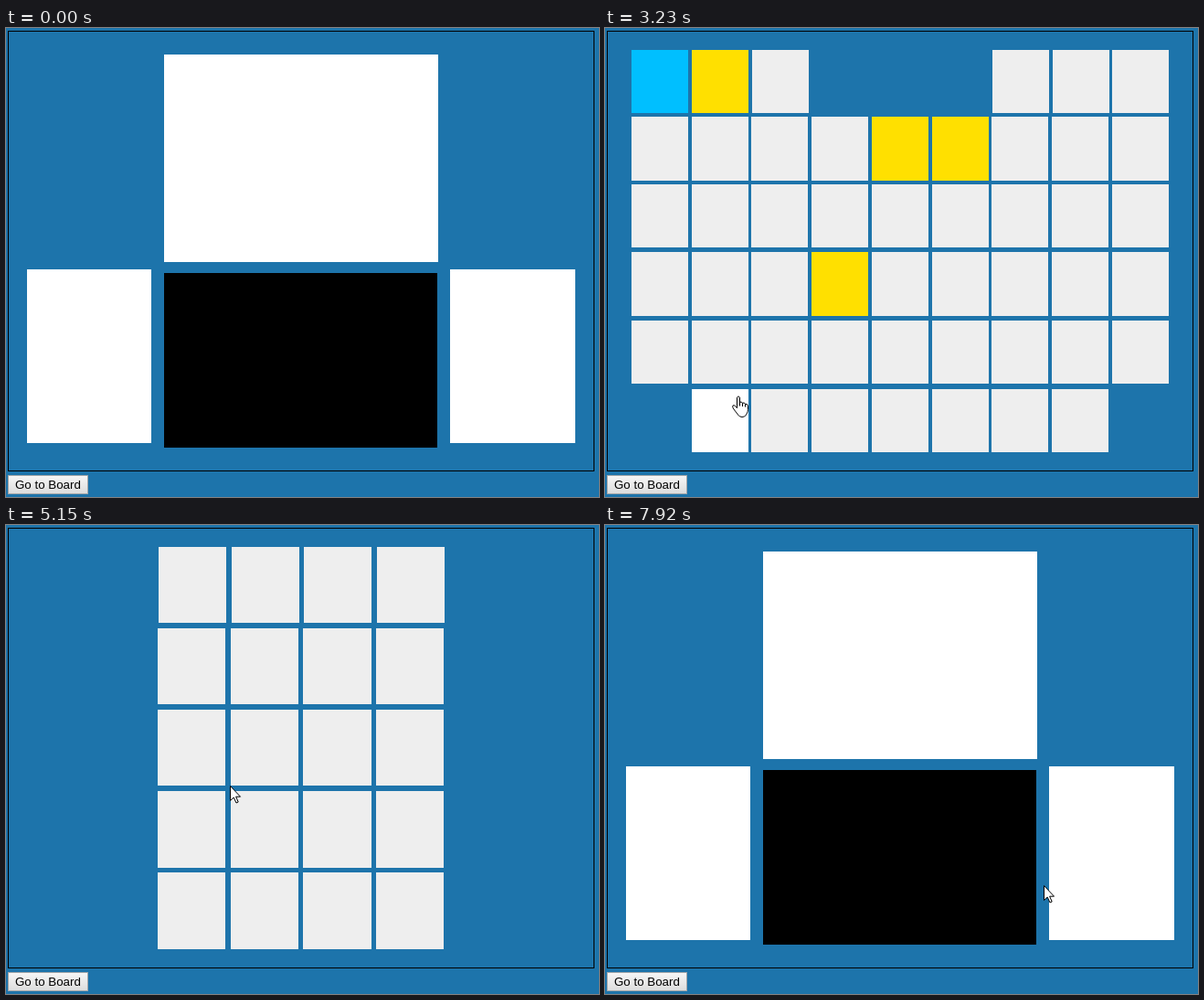
An HTML page with a canvas that plays this animation: 649x513 px, repeating every 8 s.

```html
<!DOCTYPE html>
<html lang="en">
<head>
<meta charset="utf-8">
<title>Board zoom</title>
<style>
html, body { margin: 0; width: 100%; height: 100%; overflow: hidden; background: #1d74ab; }
canvas { display: block; }
</style>
</head>
<body>
<canvas id="stage" width="649" height="513"></canvas>
<script>
const ctx = document.getElementById('stage').getContext('2d');
const LOOP = 8000, ZOOM = 400;
const BLUE = '#1d74ab', YELLOW = '#ffe000', SKY = '#00bfff', PLAIN = '#eeeeee';

const panel = (x, y, w, h, color = '#fff') => ({ x, y, w, h, color });
const panels = [
  panel(172.8, 29, 300.2, 226.8),
  panel(23, 264.2, 136, 189.6),
  panel(486, 264.2, 137, 189.8),
  panel(173.2, 268.2, 298.8, 190.8, '#000')
];

// Each board has its offset at full zoom and the times it opens and closes
const wide = { scale: 2, x: -322, y: -39, opens: 1003, closes: 3674, cells: [] };
const tall = { scale: 2.4, x: 104.8, y: -615.6, opens: 4540, closes: 7380, cells: [] };

// Cells are laid out as seen at full zoom
function addCell(board, r, c, x, y, w, h) {
  const s = board.scale;
  board.cells.push({
    r, c, x: (x - board.x) / s, y: (y - board.y) / s, w: w / s, h: h / s,
    color: PLAIN, since: Infinity
  });
}

for (let r = 0; r < 6; r++) for (let c = 0; c < 9; c++) {
  const gap = r === 0 ? c > 2 && c < 6 : r === 5 && c % 8 === 0;
  if (!gap) addCell(wide, r, c, 28.8 + 65.75 * c + (r ? 0 : 0.6), 24 + 73.3 * r + 0.17 * r * r, 62, 69.2);
}
for (let r = 0; r < 5; r++) for (let c = 0; c < 4; c++)
  addCell(tall, r, c, 166.1 + 79.6 * c + (r ? 0 : 0.9), 24.1 + 89.05 * r, 74.3, 83.3);

function paint(board, r, c, since, color = YELLOW) {
  Object.assign(board.cells.find(k => k.r === r && k.c === c), { since, color });
}
paint(wide, 0, 0, 0, SKY);
paint(wide, 0, 1, 0);
paint(wide, 1, 4, 1900);
paint(wide, 1, 5, 2220);
paint(wide, 3, 3, 2830);
for (let c = 0; c < 4; c++) paint(tall, 2, c, 5590 + 285 * c);

// Pointer moves: start, end, x, y and an optional upward bend
const moves = [
  [270, 750, 329, 174, 115], [1400, 1720, 325, 135], [1930, 2080, 371, 146],
  [2290, 2690, 266, 265], [2920, 3480, 59, 500], [3870, 4290, 89, 332],
  [5020, 5150, 245, 285], [5150, 5380, 225, 259], [5615, 5690, 261, 258],
  [5850, 6000, 369, 256], [6160, 6300, 440, 256], [6560, 7000, 57, 493],
  [7390, 7920, 480, 394]
];

const clamp = v => Math.min(1, Math.max(0, v));

function pointerAt(t) {
  if (t < 290) return null;
  let x = 648, y = 352;
  for (const [start, end, toX, toY, bend = 0] of moves) {
    if (t < start) break;
    const f = clamp((t - start) / (end - start)), e = f * f * (3 - 2 * f);
    x += (toX - x) * e;
    y += (toY - y) * e - bend * 4 * e * (1 - e);
  }
  return { x, y };
}

const swing = (t, start) => 0.5 - Math.cos(clamp((t - start) / ZOOM) * Math.PI) / 2;

function viewAt(t) {
  const board = t < 4400 ? wide : tall;
  const p = swing(t, board.opens) - swing(t, board.closes);
  const s = 1 + p * (board.scale - 1);
  const snap = (v, offset) => Math.round(v * s + p * offset);
  const place = ({ x, y, w, h }) => {
    const left = snap(x, board.x), top = snap(y, board.y);
    return [left, top, snap(x + w, board.x) - left, snap(y + h, board.y) - top];
  };
  return { board, p, place };
}

const inside = (q, [x, y, w, h]) => q && q.x >= x && q.x < x + w && q.y >= y && q.y < y + h;

function drawButton(pressed) {
  const g = ctx.createLinearGradient(0, 490, 0, 509);
  g.addColorStop(0, pressed ? '#dddddd' : '#f6f6f6');
  g.addColorStop(1, pressed ? '#f2f2f2' : '#dddddd');
  ctx.fillStyle = g;
  ctx.fillRect(2, 489, 88, 21);
  ctx.strokeStyle = '#a2a6a9';
  ctx.lineWidth = 1;
  ctx.strokeRect(2.5, 489.5, 87, 20);
  ctx.fillStyle = '#000';
  ctx.font = '13.333px "Liberation Sans", Arial, sans-serif';
  ctx.fillText('Go to Board', 10, 504);
}

const arrow = new Path2D('M.5 .5V16.5L4.2 13L7 19L9.2 18L6.6 12.2H11.5Z');
const hand = new Path2D('M5.5 2.2Q7 -.8 8.5 2.2V7.5Q10.5 6 11.5 8.3Q13.7 7 14.5 9.4' +
  'Q17 8.7 17.4 11.3V15.5C17.4 18.5 16 19.5 15.3 21.5Q13.5 23.5 11 23.5' +
  'Q8 23.5 6.5 21C5 18.5 2 15.8 .7 12.7Q.3 10.3 2.6 10.7L5.5 13.7Z');
const knuckles = new Path2D('M8.5 7V11.5M11.5 8.3V12M14.5 9.4V12.5');

function drawPointer({ x, y }, isHand) {
  const shape = isHand ? hand : arrow;
  ctx.save();
  ctx.translate(Math.round(x) - (isHand ? 6 : 0), Math.round(y));
  ctx.fillStyle = '#fff';
  ctx.strokeStyle = '#000';
  ctx.lineWidth = 1;
  ctx.fill(shape);
  ctx.stroke(shape);
  if (isHand) ctx.stroke(knuckles);
  ctx.restore();
}

function draw(t) {
  const { board, p, place } = viewAt(t);
  const pointer = pointerAt(t);
  let isHand = false;

  ctx.fillStyle = BLUE;
  ctx.fillRect(0, 0, 649, 513);

  ctx.save();
  ctx.beginPath();
  ctx.rect(3, 4, 640, 480);
  ctx.clip();
  ctx.globalAlpha = 1 - p;
  for (const k of panels) {
    const box = place(k);
    ctx.fillStyle = k.color;
    ctx.fillRect(...box);
    if (p < 0.9 && k.color === '#fff' && inside(pointer, box)) isHand = true;
  }
  ctx.globalAlpha = p;
  if (p > 0) for (const k of board.cells) {
    const box = place(k), over = inside(pointer, box);
    if (over) isHand = true;
    ctx.fillStyle = t >= k.since ? k.color : over && p === 1 ? '#fff' : PLAIN;
    ctx.fillRect(...box);
  }
  ctx.restore();

  ctx.strokeStyle = '#000';
  ctx.lineWidth = 1;
  ctx.strokeRect(2.5, 3.5, 641, 481);

  const untilClose = board.closes - t;
  drawButton(untilClose > 10 && untilClose < 80);
  if (pointer) drawPointer(pointer, isHand && pointer.y < 484);
}

const began = performance.now();
function tick() {
  draw((performance.now() - began) % LOOP);
  requestAnimationFrame(tick);
}
tick();
</script>
</body>
</html>
```
